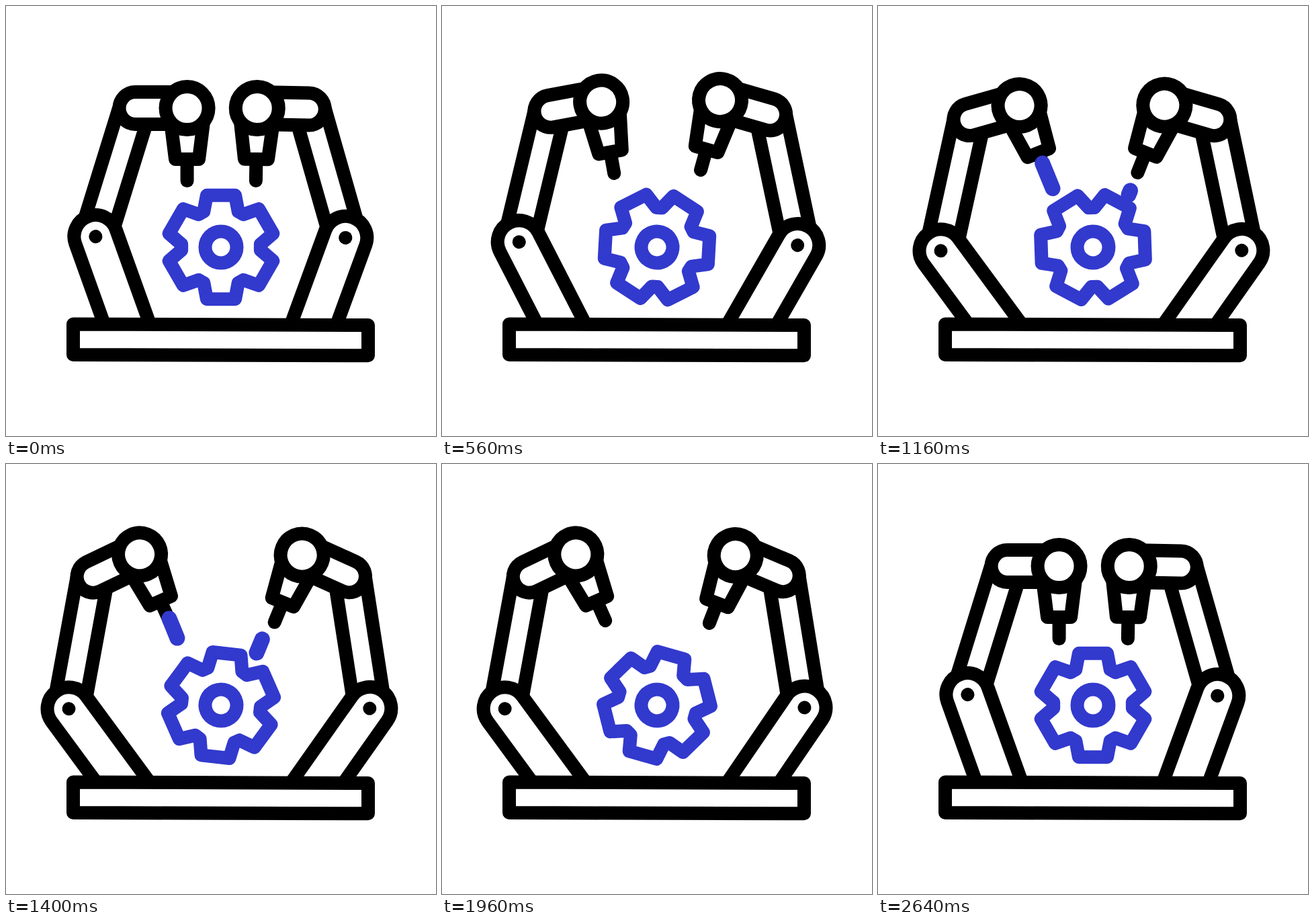
These frames come from a looping animation (640x640 px, 3000 ms). An HTML page:

```html
<!DOCTYPE html>
<html lang="en">
<head>
<meta charset="utf-8">
<title>Robot arms and gear</title>
<style>
  html, body { margin: 0; width: 100%; height: 100%; overflow: hidden; background: #fff; }
  svg { display: block; width: 100vw; height: 100vh; }
  .line { fill: #fff; stroke: #000; stroke-width: 20; stroke-linejoin: round; }
  .tip { stroke-linecap: round; }
  .blue { fill: none; stroke: #3239cd; stroke-width: 20; stroke-linejoin: round; }
  .beam { stroke-width: 23; stroke-linecap: round; }
</style>
</head>
<body>
<svg viewBox="0 0 640 640">
  <defs>
    <g id="lower">
      <path class="line" d="M-32 8V-156A32 32 0 0 1 32 -156V8"/>
      <circle cy="-156" r="10"/>
    </g>
    <path id="fore" class="line" d="M-23.5 0V-200M22.5 0V-200"/>
    <path id="upper" class="line" d="M77 -24H0A24 24 0 0 0 0 24H77"/>
    <g id="head">
      <path class="line tip" d="M0 76V108"/>
      <path class="line" d="M-24.5 20L-17.5 76H17.5L24.5 20"/>
      <circle class="line" r="32"/>
    </g>
  </defs>
  <g id="gear" class="blue">
    <circle r="23.5"/>
    <path id="teeth"/>
  </g>
  <g id="arms"></g>
  <path class="line" d="M100 473.5L539 475V520.3L100 519Z"/>
  <g id="beams"></g>
</svg>
<script>
const LOOP = 3000, STEP = 40, END = 2640;
const $ = id => document.getElementById(id);
const rad = deg => deg * Math.PI / 180;
const smooth = x => x * x * (3 - 2 * x);
const clamp = x => Math.min(1, Math.max(0, x));

function add(parent, tag, attrs) {
  const el = document.createElementNS("http://www.w3.org/2000/svg", tag);
  for (const k in attrs) el.setAttribute(k, attrs[k]);
  return parent.appendChild(el);
}

// Gear outline: four corners (radius, angle) per tooth
const corners = [[59, -25.8], [80, -15.3], [80, 15.3], [59, 25.8]];
let outline = "";
for (let i = 0; i < 6; i++)
  for (const [r, a] of corners) {
    const q = rad(a + i * 60);
    outline += (outline ? "L" : "M") + (r * Math.sin(q)).toFixed(2) + " " + (-r * Math.cos(q)).toFixed(2);
  }
$("teeth").setAttribute("d", outline + "Z");

const spin = [[0, 0], [320, 6.8], [800, 51.3], [1160, 92], [1640, 134.3], [1960, 164.2], [END, 180]];

function gearAngle(t) {
  const last = spin.length - 1;
  const slope = i => i === 0 || i === last ? 0 :
    (spin[i + 1][1] - spin[i - 1][1]) / (spin[i + 1][0] - spin[i - 1][0]);
  let i = 0;
  while (i < last - 1 && t > spin[i + 1][0]) i++;
  const [t0, y0] = spin[i], [t1, y1] = spin[i + 1];
  const d = t1 - t0, x = clamp((t - t0) / d), s = smooth(x);
  return y0 + (y1 - y0) * s + d * x * (1 - x) * (slope(i) * (1 - x) - slope(i + 1) * x);
}

// Joint angles: lower link, forearm, upper link, nozzle
const L = { rest: [19.7, 17.2, 0, 0], out: [36.1, 9.1, 23.2, 22.3], high: [36.35, 10.4, 25.6, 24], low: [36.35, 12.4, 15.8, 21.8] };
const R = { rest: [20.1, 15.9, 1.1, 1], out: [35.2, 9.8, 24.2, 23.5], high: [35.2, 8.8, 24.2, 22.3], low: [35.2, 11.9, 16.2, 21.7] };

const bob = p => [[920, p.out], [1160, p.low], [1400, p.high], [1640, p.low], [1880, p.high]];
const arms = [
  { base: "translate(186 490)", lower: 156, fore: 200, keys: [[240, L.rest], ...bob(L), [1940, L.high], [2540, L.rest]] },
  { base: "translate(452 490.5) scale(-1 1)", lower: 155, fore: 199, keys: [[200, R.rest], [800, R.out], ...bob(R), [2440, R.rest]] }
];
for (const arm of arms) {
  const g = add($("arms"), "g", { transform: arm.base });
  arm.parts = {};
  for (const id of ["fore", "lower", "upper", "head"])
    arm.parts[id] = add(g, "use", { href: "#" + id });
}

function poseAt(keys, t) {
  let i = 0;
  while (i < keys.length - 2 && t > keys[i + 1][0]) i++;
  const [t0, p] = keys[i], [t1, q] = keys[i + 1];
  const s = smooth(clamp((t - t0) / (t1 - t0)));
  return p.map((v, j) => v + (q[j] - v) * s);
}

function drawArm({ parts, keys, lower, fore }, t) {
  const [a, b, c, d] = poseAt(keys, t);
  const sx = -lower * Math.sin(rad(a)), sy = -lower * Math.cos(rad(a));
  const ex = sx + fore * Math.sin(rad(b)), ey = sy - fore * Math.cos(rad(b));
  const hx = ex + 77 * Math.cos(rad(c)), hy = ey - 77 * Math.sin(rad(c));
  const put = (id, x, y, r, dy = 0) =>
    parts[id].setAttribute("transform", `translate(${x} ${y}) rotate(${r}) translate(0 ${dy})`);
  put("lower", 0, 0, -a, 156 - lower);
  put("fore", sx, sy, b, 200 - fore);
  put("upper", ex, ey, -c);
  put("head", hx, hy, -d);
}

// Each pulse grows to the far end, then its tail follows
const beams = [
  { from: [243, 230], to: [260, 271.5], start: 995, grow: 150 },
  { from: [394, 230], to: [373, 281], start: 899, grow: 139 }
];
for (const b of beams) b.el = add($("beams"), "path", { class: "blue beam" });

function drawBeam({ from, to, start, grow, el }, t) {
  const age = t - start, on = age > 0 && age < grow * 6;
  el.style.display = on ? "" : "none";
  if (!on) return;
  const x = age % (grow * 2) / grow;
  const at = k => from.map((v, i) => v + (to[i] - v) * k).join(" ");
  el.setAttribute("d", `M${at(clamp(x - 1))}L${at(clamp(x))}`);
}

function draw(now) {
  const t = Math.min(END, Math.floor(Math.max(0, now - begin) % LOOP / STEP) * STEP);
  $("gear").setAttribute("transform", `translate(320 359) rotate(${-gearAngle(t)})`);
  arms.forEach(a => drawArm(a, t));
  beams.forEach(b => drawBeam(b, t));
}

const begin = performance.now();
function loop(now) {
  draw(now);
  requestAnimationFrame(loop);
}
draw(begin);
requestAnimationFrame(loop);
</script>
</body>
</html>
```
